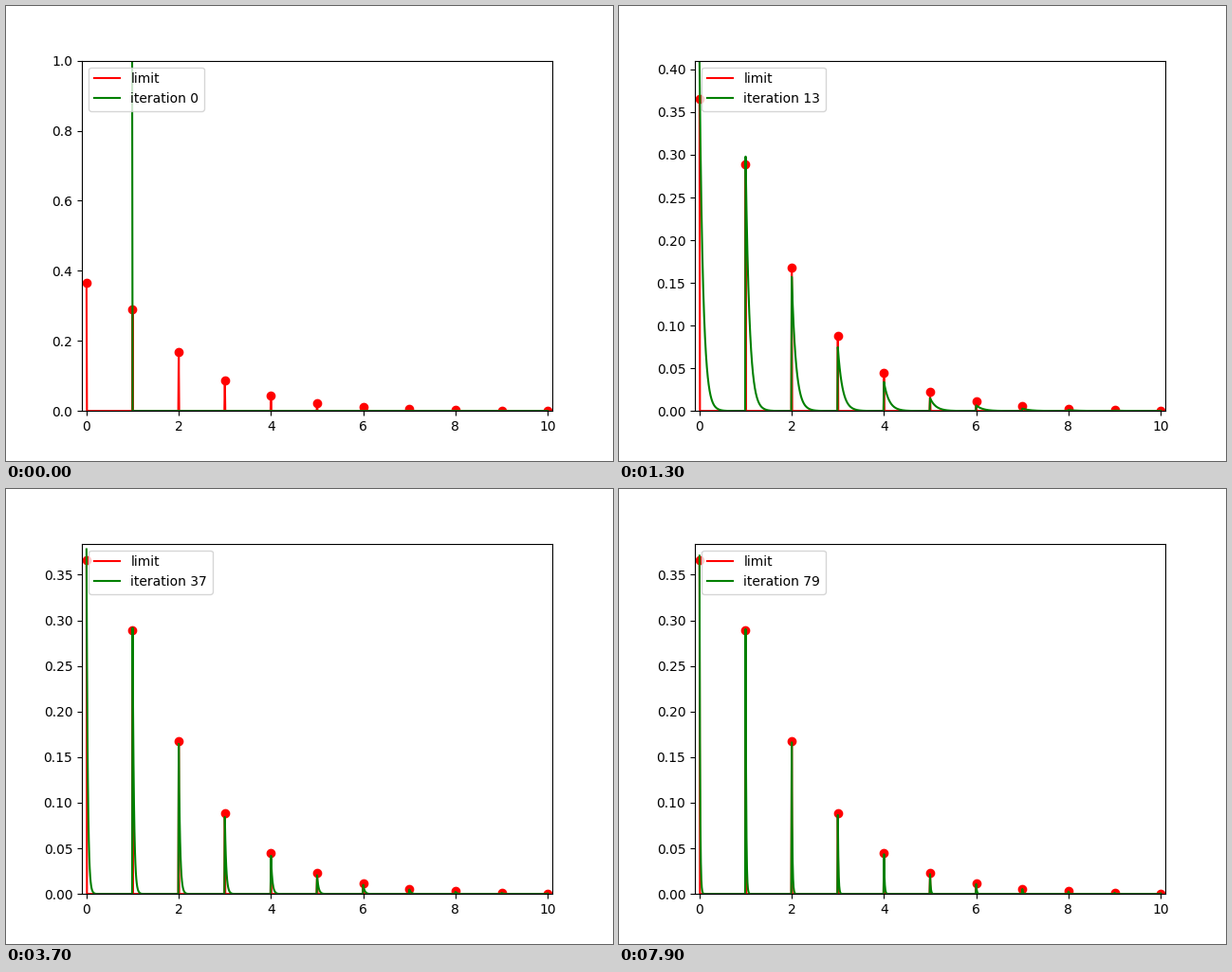
Recreate the animation shown at these times as a matplotlib script. Size 640 px wide and 480 px high, loop 8000 ms.

```python
import numpy as np
import matplotlib.pyplot as plt
from matplotlib.animation import FuncAnimation

FRAMES = 80
STEPS = 100  # samples per unit of x

i = np.arange(10 * STEPS + 1)
x = i / STEPS
ks = np.arange(11)

# Stationary law: each ratio is 1 / (2 (1 - e^-k)).
limit = np.cumprod(np.r_[1, 0.5 / (1 - np.exp(-ks[1:]))])
limit /= limit.sum()


def jump(n):
    """Weight of moving one unit right, which settles at 1/2."""
    return 0.5 - 0.7 * (n + 1) ** -1.13 + np.exp(-1.3 * n)


def iterate(f, n):
    """Decay in place, add the part shifted by one, normalise."""
    g = np.exp(-x) * f
    g[STEPS:] += jump(n) * f[:-STEPS]
    return g / g[::STEPS].sum()


curves = [np.where(i < STEPS, 1.0, 0.0)]
for n in range(FRAMES - 1):
    curves.append(iterate(curves[-1], n))

fig, ax = plt.subplots(figsize=(6.4, 4.8), dpi=100)
spikes = np.zeros_like(x)
spikes[::STEPS] = limit
ax.plot(x, spikes, "r", label="limit")
ax.plot(ks, limit, "ro")
line, = ax.plot(x, curves[0], "g", label="iteration 0")
ax.set_xlim(-0.1, 10.1)
label = ax.legend(loc="upper left").get_texts()[1]


def update(n):
    line.set_ydata(curves[n])
    label.set_text(f"iteration {n}")
    ax.set_ylim(0, max(1.05 * limit[0], curves[n].max()))
    return line, label


anim = FuncAnimation(fig, update, frames=FRAMES, interval=100,
                     repeat=True, repeat_delay=0, blit=False)
plt.show()
```
